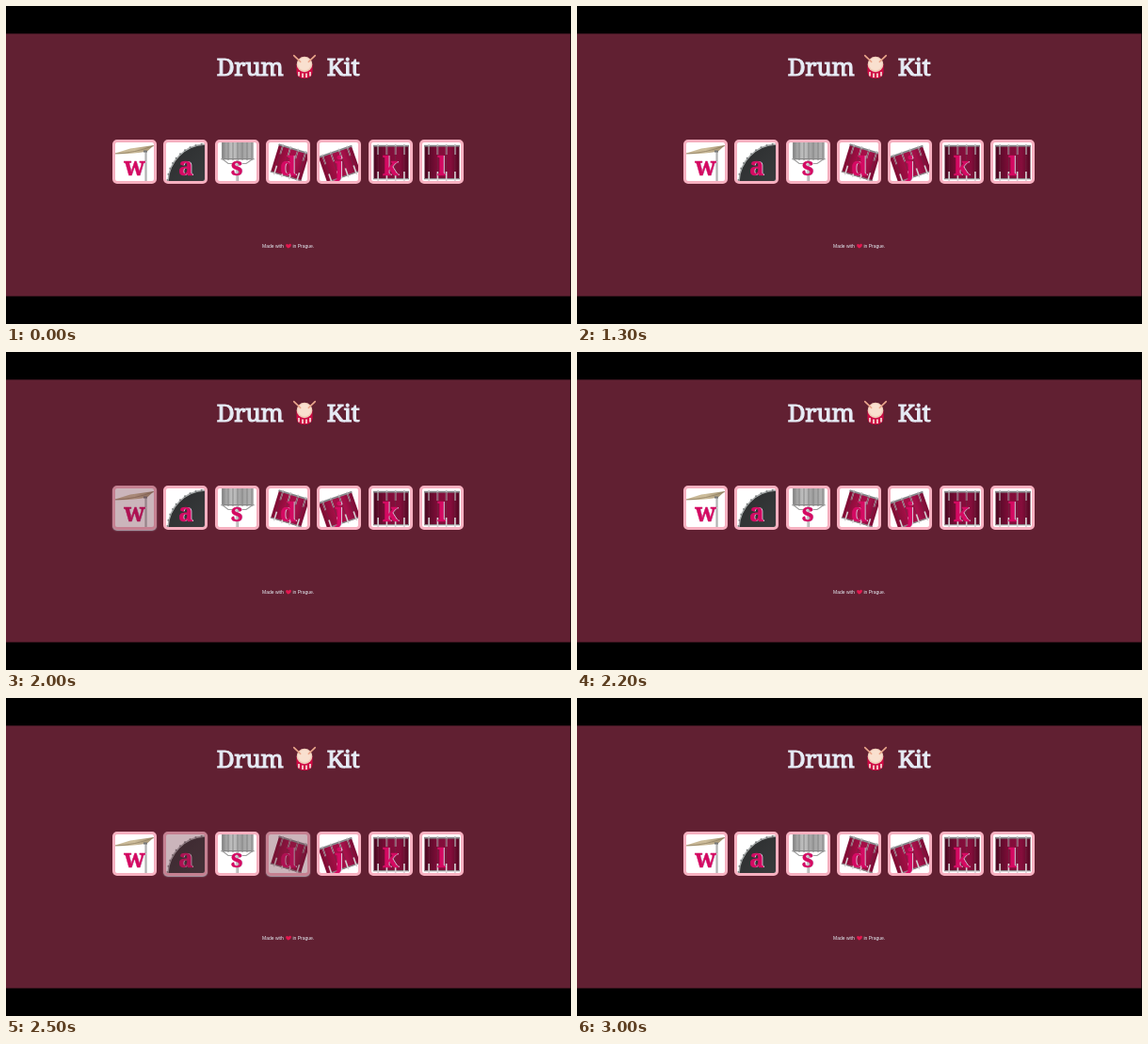
Animation, 600 px wide and 338 px high, one loop 3900 ms. Source, as an HTML page:

```html
<!DOCTYPE html>
<html lang="en">
<head>
<meta charset="utf-8">
<title>Drum Kit</title>
<style>
  html, body { margin: 0; width: 100%; height: 100%; overflow: hidden; background: #000; }
  #stage { position: absolute; left: 0; top: 0; width: 600px; height: 338px; overflow: hidden; background: #000; }
  svg { position: absolute; left: 0; top: 0; }
  .title { font: 26px "Noto Serif", serif; letter-spacing: -.4px; fill: #e6ebf5; stroke: #e6ebf5; stroke-width: 1.1px; }
  .foot { font: 5px "Liberation Sans", Arial, sans-serif; fill: #e6eef5; }
  .key {
    position: absolute; top: 142px; width: 47px; height: 47px; box-sizing: border-box;
    border: 3.2px solid #f6b0c0; border-radius: 5px; background: #fff; overflow: hidden;
  }
  .key.down { opacity: .67; box-shadow: 0 1px 1.3px #dbedf3; }
  .key b {
    position: absolute; left: 0; width: 100%; top: 6px; text-align: center;
    font: bold 26.5px/38px "Noto Serif", serif; color: #d40a62; text-shadow: 1px 0 #dbedf3;
    -webkit-text-stroke: .4px #d40a62;
  }
</style>
</head>
<body>
<div id="stage">
  <svg width="600" height="338" viewBox="0 0 600 338">
    <defs>
      <linearGradient id="shell">
        <stop offset="0" stop-color="#7d0d33"/><stop offset=".35" stop-color="#a30f46"/>
        <stop offset=".7" stop-color="#a5114a"/><stop offset="1" stop-color="#7a0c34"/>
      </linearGradient>
      <linearGradient id="deep">
        <stop offset="0" stop-color="#4a0a22"/><stop offset=".4" stop-color="#820d3a"/>
        <stop offset=".75" stop-color="#860e3c"/><stop offset="1" stop-color="#520923"/>
      </linearGradient>
      <linearGradient id="steel">
        <stop offset="0" stop-color="#8c8c8c"/><stop offset=".35" stop-color="#c4c4c4"/>
        <stop offset=".6" stop-color="#a0a0a0"/><stop offset="1" stop-color="#b5b5b5"/>
      </linearGradient>
      <linearGradient id="skin" x2="1" y2="1">
        <stop offset="0" stop-color="#2b2d2e"/><stop offset="1" stop-color="#484b4d"/>
      </linearGradient>
      <linearGradient id="brass">
        <stop offset="0" stop-color="#c4b391"/><stop offset=".5" stop-color="#cdbd9b"/>
        <stop offset="1" stop-color="#a08e6d"/>
      </linearGradient>
    </defs>
    <rect y="29.4" width="599.4" height="279.1" fill="#612032"/>
    <text class="title" x="223.8" y="74">Drum</text>
    <text class="title" x="340.8" y="74">Kit</text>

    <path d="M308.500 62V71Q309.500 77 317 77T325.500 71V62Z" fill="#cf0b45"/>
    <path d="M311 70v4.500M315 71.500v4.500M319 71.500v4.500M323 70v4.500" stroke="#f6dcd6" stroke-width="1.700"/>
    <ellipse cx="317" cy="62" rx="8.300" ry="8.300" fill="#f0cdb9"/>
    <ellipse cx="317" cy="61.500" rx="7" ry="6.800" fill="#f9e0cf"/>
    <path d="M305.700 52.700l7 6.600M328.300 52.700l-7 6.600" stroke="#eba78c" stroke-width="1.600" stroke-linecap="round"/>

    <text class="foot" x="272" y="257">Made with</text>
    <path d="M299.800 257.600C296.500 256 296.600 253 298.300 252.900Q299.500 252.800 300 254Q300.700 252.500 302 252.700C303.800 253.200 302.800 256.200 299.800 257.600Z" fill="#e3174f"/>
    <text class="foot" x="304.500" y="257">in Prague.</text>
  </svg>
</div>

<script>
const LOOP = 3900;
const LETTERS = 'wasdjkl';

// keys held down, from and until (ms)
const HITS = [
  ['a', 1700, 1800],
  ['w', 2000, 2200],
  ['k', 2300, 2400],
  ['wl', 2400, 2500],
  ['ad', 2500, 2600],
  ['s', 2600, 2700],
];

const range = (n, f) => Array.from({ length: n }, (_, i) => f(i)).join('');
const rect = (x, y, w, h, fill) => `<rect x="${x}" y="${y}" width="${w}" height="${h}" fill="${fill}"/>`;
const line = (d, color, width) => `<path d="${d}" fill="none" stroke="${color}" stroke-width="${width}"/>`;

// Shell with hoops and evenly spaced tension rods.
function tom(x, y, w, h, rods, fill, turn = 0) {
  const gap = w / rods;
  const rod = i => {
    const rx = x + gap * (i + .5);
    return rect(rx - .8, y - 2, 1.6, 11, '#bcbcbe') + rect(rx - .3, y, .6, h, '#6a2a42') +
      rect(rx - .8, y + h - 8, 1.6, 10, '#d6d2d4');
  };
  return `<g transform="rotate(${turn} ${x + w / 2} ${y + h / 2})">` +
    rect(x, y, w, h, `url(#${fill})`) + rect(x - .5, y - 1.2, w + 1, 1.8, '#85878a') +
    rect(x - .5, y + h - 1, w + 1, 1.3, '#8b8588') + range(rods, rod) + '</g>';
}

const ART = {
  w: rect(31, 9, 2, 32, '#d2d2d2') + rect(32.6, 10, .8, 31, '#808283') +
    '<path d="M0 11.500L16 6.500L41 3L34 9.500Q15 13 0 12Z" fill="url(#brass)"/>' +
    line('M0 12Q20 11.500 41 3.500', '#8c7b60', .7) + rect(30, 8.5, 4, 2, '#757575'),
  a: '<circle cx="43" cy="43" r="41" fill="url(#skin)"/>' +
    '<circle cx="43" cy="43" r="41" fill="none" stroke="#a9adad" stroke-width="1.500"/>' +
    '<circle cx="43" cy="43" r="41.500" fill="none" stroke="#7c8081" stroke-width="2" stroke-dasharray="1.800 4.500"/>',
  s: rect(4, 0, 34, 18, 'url(#steel)') +
    range(7, i => rect(5.5 + i * 5, 0, 1, 19, '#838383')) +
    rect(3.5, 17, 35, 1.3, '#868686') +
    line('M4 17L11 22.500H30L38 17', '#9d9d9d', 1.1) +
    rect(19, 18, 2.6, 23, '#cacaca') + rect(21, 18, .7, 23, '#959595'),
  d: tom(5.8, 6.8, 33.5, 30, 4, 'shell', 17),
  j: tom(2.6, 9.4, 37, 28, 4, 'shell', -19),
  k: tom(2.5, 4, 37, 35, 4, 'deep'),
  l: tom(2.5, 4, 37, 35, 4, 'deep'),
};

const stage = document.getElementById('stage');
const keys = [...LETTERS].map((letter, i) => {
  const key = document.createElement('div');
  key.className = 'key';
  key.style.left = 113 + i * 54.35 + 'px';
  key.innerHTML = `<svg width="41" height="41" viewBox="0 0 41 41">${ART[letter]}</svg><b>${letter}</b>`;
  stage.append(key);
  return key;
});

function draw(now) {
  const t = now % LOOP;
  const held = HITS.filter(([, from, until]) => t >= from && t < until).map(hit => hit[0]).join('');
  keys.forEach((key, i) => key.classList.toggle('down', held.includes(LETTERS[i])));
}

const start = performance.now();
function tick() {
  draw(performance.now() - start);
  requestAnimationFrame(tick);
}
tick();
</script>
</body>
</html>
```
